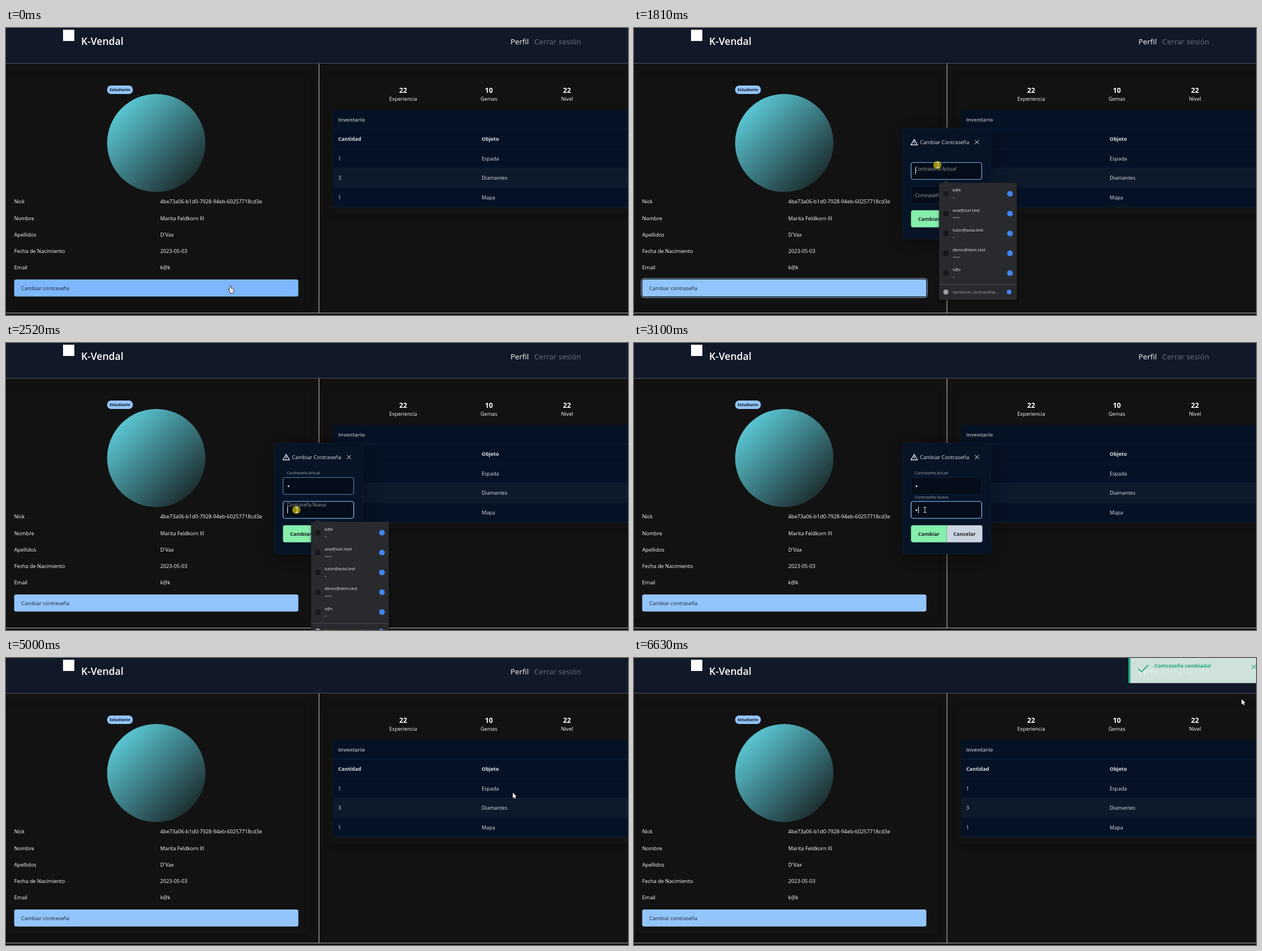
An HTML page with a canvas that plays this animation: 1101x509 px, repeating every 6730 ms.

```html
<!DOCTYPE html>
<html lang="es">
<head>
<meta charset="utf-8">
<title>Perfil</title>
<style>
html, body { margin: 0; width: 100%; height: 100%; overflow: hidden; background: #121212; }
canvas { display: block; }
</style>
</head>
<body>
<canvas id="stage" width="1101" height="509"></canvas>
<script>
const ctx = document.getElementById('stage').getContext('2d');
const LOOP = 6730;
const FONT = '"Open Sans", "Noto Sans", sans-serif';
const BLUE = '#93c5fd', INK = '#1c2127', PANEL = '#071426', EDGE = '#0b213f';

// Moments of the story, in ms
const OPEN_CLICK = 820, DIALOG_IN = 872, FOCUS1 = 1783, TYPE1 = 2060,
      FOCUS2 = 2470, TYPE2 = 3000, SUBMIT = 3640, DIALOG_OUT = 4690, TOAST_IN = 5145;
// Spans in which the screen stands still
const PAUSES = [[2840, 2940], [3280, 3520], [4120, 4220], [4520, 4690], [5330, 5430], [6030, 6130]];

// time, x, y of the pointer tip
const PATH = [
  [0, 397, 457], [1260, 397, 457], [1720, 538, 243], [2230, 538, 243], [2430, 515, 296],
  [3520, 515, 296], [3630, 505, 340], [3850, 505, 340], [4120, 641, 343], [4220, 641, 343],
  [4510, 897, 239], [5430, 897, 239], [6030, 1066, 66], [6130, 1066, 66], [6600, 1075.5, 73]
];

const clamp = v => Math.max(0, Math.min(1, v));
const lerp = (a, b, p) => a + (b - a) * p;

function bezier(x1, y1, x2, y2) {
  const at = (a, b, s) => 3 * a * s * (1 - s) ** 2 + 3 * b * s * s * (1 - s) + s ** 3;
  return p => {
    let lo = 0, hi = 1;
    for (let i = 0; i < 18; i++) {
      const mid = (lo + hi) / 2;
      if (at(x1, x2, mid) < p) lo = mid; else hi = mid;
    }
    return at(y1, y2, (lo + hi) / 2);
  };
}
const ease = bezier(.25, .1, .25, 1);
const easeOut = bezier(0, 0, .2, 1);
const easeInOut = bezier(.4, 0, .2, 1);

function ramp(t, start, dur, curve = ease) {
  const p = clamp((t - start) / dur);
  return p === 0 || p === 1 ? p : curve(p);
}
const during = (t, a, b, rise = 200) => ramp(t, a, rise) * (1 - ramp(t, b, 200));
const mix = (a, b, p) => `rgb(${a.map((v, i) => Math.round(lerp(v, b[i], p)))})`;

function text(s, x, y, size, color = '#fff', weight = 400, align = 'left') {
  ctx.font = `${weight} ${size}px ${FONT}`;
  ctx.fillStyle = color;
  ctx.textAlign = align;
  ctx.fillText(s, x, y);
}
function rect(x, y, w, h, color) {
  ctx.fillStyle = color;
  ctx.fillRect(x, y, w, h);
}
function box(x, y, w, h, r, fill, stroke, lw = 1) {
  ctx.beginPath();
  ctx.roundRect(x, y, w, h, r);
  if (fill) { ctx.fillStyle = fill; ctx.fill(); }
  if (stroke) { ctx.strokeStyle = stroke; ctx.lineWidth = lw; ctx.stroke(); }
}
function disc(x, y, r, color) {
  ctx.beginPath();
  ctx.arc(x, y, r, 0, Math.PI * 2);
  ctx.fillStyle = color;
  ctx.fill();
}
function line(points, color, lw, close) {
  ctx.beginPath();
  points.forEach(([x, y]) => ctx.lineTo(x, y));
  if (close) ctx.closePath();
  ctx.strokeStyle = color;
  ctx.lineWidth = lw;
  ctx.stroke();
}
function cross(x, y, r, color) {
  line([[x - r, y - r], [x + r, y + r]], color, 1.1);
  line([[x - r, y + r], [x + r, y - r]], color, 1.1);
}
function group(alpha, draw) {
  if (alpha <= 0) return;
  ctx.save();
  ctx.globalAlpha *= alpha;
  draw();
  ctx.restore();
}
function shadow(blur, dy, alpha) {
  ctx.shadowColor = `rgba(0,0,0,${alpha})`;
  ctx.shadowBlur = blur;
  ctx.shadowOffsetY = dy;
}
function card(x, y, w, h) {
  group(1, () => { shadow(16, 3, .4); box(x, y, w, h, 4, '#121212'); });
}

function ring(x, y, w, h, color, alpha) {
  group(alpha, () => {
    box(x - .6, y - .6, w + 1.2, h + 1.2, 4, null, INK, 1.2);
    box(x - 1.8, y - 1.8, w + 3.6, h + 3.6, 5, null, color, 1.2);
  });
}
function ripple(t, start, x, y, w, h, radii, cx, cy) {
  const p = (t - start) / 400;
  if (p <= 0 || p >= 1) return;
  group(1, () => {
    ctx.beginPath();
    ctx.roundRect(x, y, w, h, radii);
    ctx.clip();
    disc(cx, cy, Math.max(w, h) * 1.25 * p, `rgba(255,255,255,${.5 * (1 - p)})`);
  });
}

function header() {
  rect(0, 0, 1101, 62, '#111827');
  rect(0, 62, 1101, 1, '#4b5568');
  rect(101, 3, 20, 20, '#fff');
  text('K-Vendal', 133, 30, 17.6, '#fff', 600);
  text('Perfil', 893, 29, 13.4);
  text('Cerrar sesión', 935, 29, 13.4, '#6b7280');
}

function profile(t) {
  card(-10, 84, 549, 405);
  const g = ctx.createLinearGradient(179, 117, 353, 291);
  g.addColorStop(0, '#66e4f3');
  g.addColorStop(1, '#111');
  disc(266, 204, 87, g);
  box(179, 102, 45.5, 15, 7, BLUE);
  text('Estudiante', 201.7, 112.3, 6.8, '#121a26', 700, 'center');
  [['Nick', '4be73a06-b1d0-7928-94eb-60257718cd3e'], ['Nombre', 'Marita Feldkorn III'],
   ['Apellidos', "D'Vax"], ['Fecha de Nacimiento', '2023-05-03'], ['Email', 'k@k']
  ].forEach(([label, value], i) => {
    const y = 311.4 + i * 29.15;
    text(label, 14.5, y, 9.2);
    text(value, 273, y, 9.2);
  });
  const x = 14.5, y = 446, w = 503, h = 30.3;
  const away = ramp(t, 1280, 200);
  box(x, y, w, h, 3.6, mix([126, 183, 252], [147, 197, 253], away));
  text('Cambiar contraseña', 27, 464.6, 9.05, INK);
  ripple(t, OPEN_CLICK, x, y, w, h, 3.6, 397, 462);
  ring(x, y, w, h, 'rgba(147,197,253,.85)', during(t, OPEN_CLICK, FOCUS1));
}

function inventory() {
  card(569, 84, 560, 245);
  [['22', 'Experiencia', 703], ['10', 'Gemas', 854.7], ['22', 'Nivel', 993]].forEach(([n, label, x]) => {
    text(n, x, 115.2, 12.2, '#fff', 700, 'center');
    text(label, x, 129.4, 9.1, '#fff', 400, 'center');
  });
  const rows = [['Inventario', ''], ['Cantidad', 'Objeto'], ['1', 'Espada'], ['3', 'Diamantes'], ['1', 'Mapa']];
  rows.forEach(([a, b], i) => {
    const y = 145.5 + i * 34.5, weight = i < 2 ? 700 : 400;
    const color = i === 0 ? '#9da2aa' : 'rgba(255,255,255,.88)';
    rect(579, y, 522, 34.5, i === 3 ? '#0c1a2c' : '#051225');
    rect(579, Math.round(y + 33.5), 522, 1, EDGE);
    text(a, 588, y + 20, 9.05, color, weight);
    text(b, 842, y + 20, 9.05, color, weight);
  });
}

function field(t, y, label, focus, blur, typed) {
  const on = during(t, focus, blur, 50), up = ramp(t, focus, 200);
  box(490.5, y, 125, 30, 3.6, '#040d19', EDGE);
  group(on, () => box(490.5, y, 125, 30, 3.6, null, BLUE, 1.2));
  text(label, 497.2, lerp(y + 19, y - 5.5, up), lerp(8.95, 6.9, up), 'rgba(255,255,255,.62)');
  if (t >= typed) disc(500, y + 15.5, 1.4, '#fff');
  const blink = Math.floor((t - Math.max(focus, t >= typed ? typed : 0)) / 500) % 2 === 0;
  if (t >= focus && t < blur && blink) rect(t >= typed ? 503 : 498, y + 9, 1, 12, '#fff');
}

function dialog(t) {
  const enter = ramp(t, DIALOG_IN, 150, easeOut), exit = ramp(t, DIALOG_OUT, 150, easeInOut);
  const shown = enter * (1 - exit), scale = lerp(.7, 1, shown);
  group(shown, () => {
    ctx.translate(553.5, 275.8);
    ctx.scale(scale, scale);
    ctx.translate(-553.5, -275.8);
    group(1, () => { shadow(40, 5, .4); box(475.5, 177.5, 156, 196.5, 3.6, PANEL); });
    box(475.5, 177.5, 156, 196.5, 3.6, null, EDGE, .7);
    ctx.lineJoin = 'round';
    line([[496, 197.5], [501.7, 207.4], [490.3, 207.4]], '#f1f2f4', 1.3, true);
    rect(495.4, 200.6, 1.2, 3.2, '#fff');
    rect(495.4, 204.6, 1.2, 1.2, '#fff');
    text('Cambiar Contraseña', 506.3, 205.7, 9.1, 'rgba(255,255,255,.88)');
    cross(607, 202.3, 3.5, 'rgba(255,255,255,.65)');
    field(t, 238.5, 'Contraseña Actual', FOCUS1, FOCUS2, TYPE1);
    field(t, 281, 'Contraseña Nueva', FOCUS2, SUBMIT, TYPE2);
    const x = 490.3, y = 323.2, w = 63.2, h = 30.2, left = [3.6, 0, 0, 3.6];
    box(x + w, y, w, h, [0, 3.6, 3.6, 0], '#cbd5e1');
    text('Cancelar', 585, 341.9, 9.05, INK, 700, 'center');
    box(x, y, w, h, left, mix([134, 239, 172], [88, 230, 140], during(t, 3590, 3920)));
    text('Cambiar', 521.8, 341.9, 9.05, INK, 700, 'center');
    ripple(t, SUBMIT, x, y, w, h, left, 505, 340);
    ring(x, y, w, h, 'rgba(134,239,172,.75)', ramp(t, SUBMIT, 200));
  });
}

function suggestions(y) {
  group(1, () => {
    shadow(6, 2, .4);
    box(540, y, 137.5, 207.5, 2, '#292a2d');
  });
  ctx.beginPath();
  ctx.moveTo(546, y + .5);
  ctx.lineTo(552, y - 5);
  ctx.lineTo(558, y + .5);
  ctx.fillStyle = '#292a2d';
  ctx.fill();
  [['k@k', 1], ['ana@zuri.test', 4], ['tutor@aula.test', 1], ['demo@dem.test', 4], ['v@v', 1]].forEach(([name, n], i) => {
    const cy = y + 19.5 + i * 35.2;
    rect(547.5, cy - 4.5, 9, 9, '#17181b');
    text(name, 564, cy - 3.7, 7.5, '#e8eaed');
    for (let k = 0; k < n; k++) disc(565.8 + k * 3.1, cy + 7, 1, '#9aa0a6');
    disc(665.5, cy, 5, '#4285f4');
  });
  rect(540, y + 180, 137.5, 1, '#46484c');
  disc(552, y + 193.7, 4.5, '#9aa0a6');
  text('Gestionar contraseñas...', 564, y + 196.4, 7.3, '#9aa0a6');
  disc(664, y + 193.7, 4, '#4285f4');
}

function toast(t) {
  const p = ramp(t, TOAST_IN, 300), y = lerp(45, -4, p);
  group(p, () => {
    box(875, y, 250, 48.5, 3.6, 'rgba(228,248,240,.9)');
    group(1, () => {
      ctx.beginPath();
      ctx.roundRect(875, y, 250, 48.5, 3.6);
      ctx.clip();
      rect(875, y, 3.6, 48.5, '#1ea97c');
    });
    ctx.lineCap = 'round';
    line([[893, y + 23.3], [898.5, y + 28.3], [910, y + 16.8]], '#1ea97c', 1.7);
    text('Contraseña cambiada!', 921, y + 20.8, 9, '#1ea97c', 700);
    cross(1097.3, y + 19.8, 3.4, '#1ea97c');
  });
}

function pointer(t) {
  let i = 0;
  while (i < PATH.length - 2 && t >= PATH[i + 1][0]) i++;
  const [t0, x0, y0] = PATH[i], [t1, x1, y1] = PATH[i + 1];
  const p = ramp(t, t0, t1 - t0, easeInOut);
  return [lerp(x0, x1, p), lerp(y0, y1, p)];
}
const inside = ([px, py], x, y, w, h) => px >= x && px < x + w && py >= y && py < y + h;

function outline(path) {
  ctx.lineJoin = 'round';
  ctx.strokeStyle = '#000';
  ctx.lineWidth = 1.4;
  ctx.stroke(path);
  ctx.fillStyle = '#fff';
  ctx.fill(path);
}
const ARROW = new Path2D('M0 0V9.4L2.2 7.4L3.7 10.8L5.3 10.1L3.8 6.8H6.8Z');
const HAND = new Path2D('M-.8 .7Q0-.6 .9 .7V5L3 5.2L5 5.8Q6.3 6.2 6.1 7.6L5.2 11.2V13H.3V11.6L-3 8.2Q-3.4 6.9-2.2 7L-.8 8.2Z');

function cursor(t) {
  const pos = pointer(t);
  const open = t > DIALOG_IN && t < DIALOG_OUT;
  const input = open && (inside(pos, 490, 238, 126, 31) || inside(pos, 490, 281, 126, 30));
  const hand = inside(pos, 14, 446, 504, 30) || open && inside(pos, 490, 323, 127, 31);
  const pressed = [OPEN_CLICK, FOCUS1 - 10, FOCUS2 - 10, SUBMIT].some(c => t >= c && t < c + 95);
  if (pressed) disc(pos[0] - 1, pos[1], 7.2, 'rgba(196,180,10,.78)');
  ctx.save();
  ctx.translate(...pos);
  if (input) {
    rect(-.5, -4.5, 1, 9, '#ddd');
    rect(-2.5, -5, 5, 1, '#ddd');
    rect(-2.5, 4, 5, 1, '#ddd');
  } else if (hand) {
    outline(HAND);
    line([[2.7, 8], [2.7, 10.8]], '#555', .6);
    line([[4.1, 8], [4.1, 10.8]], '#555', .6);
  } else {
    outline(ARROW);
  }
  ctx.restore();
}

function draw(now) {
  let t = now % LOOP;
  for (const [a, b] of PAUSES) if (t > a && t < b) t = a;
  rect(0, 0, 1101, 509, '#121212');
  profile(t);
  inventory();
  header();
  rect(553.5, 63, 1, 442, '#d4d4d4');
  rect(0, 505, 1101, 1, '#b9b9b9');
  dialog(t);
  if (t >= FOCUS1 + 15 && t < TYPE1 + 30) suggestions(274.5);
  if (t >= FOCUS2 + 15 && t < TYPE2 + 30) suggestions(317);
  toast(t);
  cursor(t);
}

const begin = performance.now();
function tick() {
  draw(performance.now() - begin);
  requestAnimationFrame(tick);
}
tick();
</script>
</body>
</html>
```
